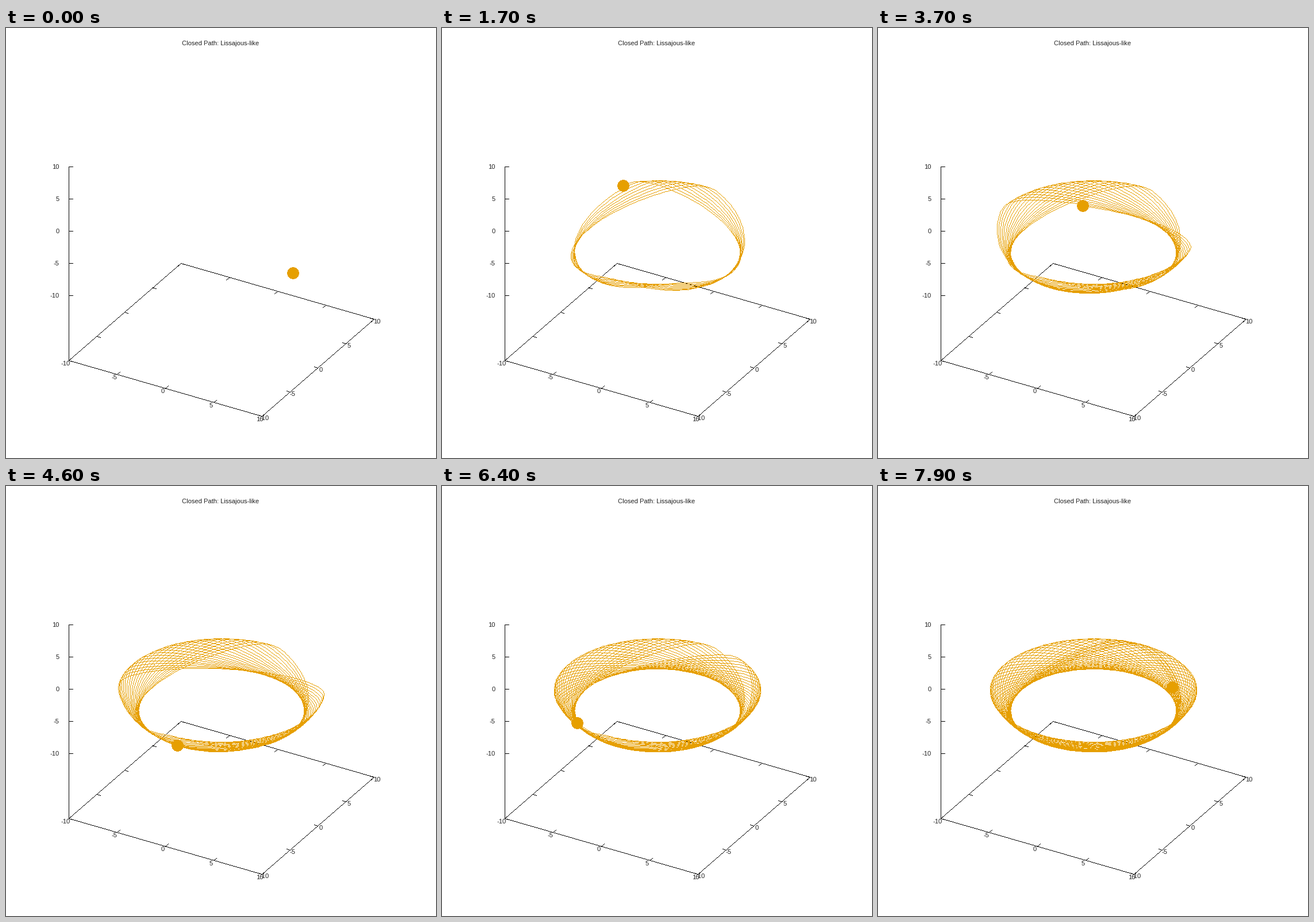
Animation, 748 px wide and 748 px high, one loop 8000 ms. Source, as a matplotlib script:

```python
import matplotlib.pyplot as plt
import numpy as np
from matplotlib.animation import FuncAnimation

SIZE, DPI = 748, 72
FRAMES, INTERVAL = 80, 100
ORANGE, BLACK = (230, 159, 0), (0, 0, 0)
FLOOR = -20.05          # height of the base plane
RADIUS2 = 96.7          # squared radius of the sphere the path lies on
BALL = 10.4             # ball radius in pixels

plt.rcParams["font.family"] = "Liberation Sans"

fig = plt.figure(figsize=(SIZE / DPI, SIZE / DPI), dpi=DPI, facecolor="white")
ax = fig.add_axes([0, 0, 1, 1])
ax.axis("off")
rows, cols = np.mgrid[:SIZE, :SIZE]


def project(x, y, z):
    """Map space to stage pixels."""
    return (374.4 + 16.8 * x + 9.74 * y,
            317.7 + 4.85 * x - 8.43 * y - 11.2 * z)


def position(t):
    """Point on the sphere: a nodding height with an uneven turn."""
    nod = np.radians(351.56) * t
    turn = np.radians(178.28 * t + 17.6 * np.sin(nod) + 0.4 * np.sin(2 * nod))
    z = -4.895 - 1.565 * np.cos(nod) + 0.085 * np.sin(nod) ** 2
    r = np.sqrt(RADIUS2 - z ** 2)
    return project(r * np.cos(turn), r * np.sin(turn), z)


def stroke(canvas, xs, ys, color):
    """Paint a crisp polyline exactly one pixel wide."""
    x, y = np.rint(xs), np.rint(ys)
    dx, dy = np.diff(x), np.diff(y)
    n = np.maximum(np.maximum(abs(dx), abs(dy)), 1).astype(int)
    seg = np.repeat(np.arange(len(n)), n)
    part = (np.arange(n.sum()) - (np.cumsum(n) - n)[seg] + 1) / n[seg]
    px = np.rint(x[seg] + dx[seg] * part).astype(int)
    py = np.rint(y[seg] + dy[seg] * part).astype(int)
    canvas[py, px] = color
    canvas[int(y[0]), int(x[0])] = color


def segment(canvas, *points):
    stroke(canvas, *np.transpose(points), BLACK)


def label(x, y, text, ha="center"):
    ax.text(x, y + 4, text, size=11.15, color="#222222", ha=ha, va="baseline")


def draw_axes():
    canvas = np.full((SIZE, SIZE, 3), 255, np.uint8)
    corners = [(-10, -10), (10, -10), (10, 10), (-10, 10), (-10, -10)]
    segment(canvas, *[project(x, y, FLOOR) for x, y in corners])
    left = 109
    segment(canvas, (left, 241.3), (left, 578))
    for i, v in enumerate(range(-10, 11, 5)):
        for side in (-10, 10):
            inward = -np.sign(side)
            segment(canvas, project(v, side, FLOOR),
                    project(v, side + 0.5 * inward, FLOOR))
            segment(canvas, project(side, v, FLOOR),
                    project(side + 0.36 * inward, v, FLOOR))
        zy = 465.3 - 56 * i
        segment(canvas, (left, zy), (left + 7, zy))
        label(92.5, zy, str(v), "right")
        label(104 + 84.3 * i, 583 + 24.2 * i, str(v))
        label(449.5 + 49 * i, 678 - 42 * i, str(v))
    label(373, 26, "Closed Path: Lissajous-like")
    return canvas


backdrop = draw_axes()
picture = ax.imshow(backdrop, extent=(0, SIZE, SIZE, 0), aspect="auto",
                    interpolation="nearest")


def update(i):
    t = max(0.0, i - 0.0112)
    xs, ys = position(np.linspace(0, t, 60 * i + 2))
    canvas = backdrop.copy()
    if i:
        stroke(canvas, xs, ys, ORANGE)
    cx, cy = np.rint(xs[-1]), np.rint(ys[-1])
    canvas[(cols - cx) ** 2 + (rows - cy) ** 2 <= BALL ** 2] = ORANGE
    picture.set_data(canvas)
    return picture,


anim = FuncAnimation(fig, update, frames=FRAMES, interval=INTERVAL,
                     repeat=True, repeat_delay=0, blit=False)
plt.show()
```
